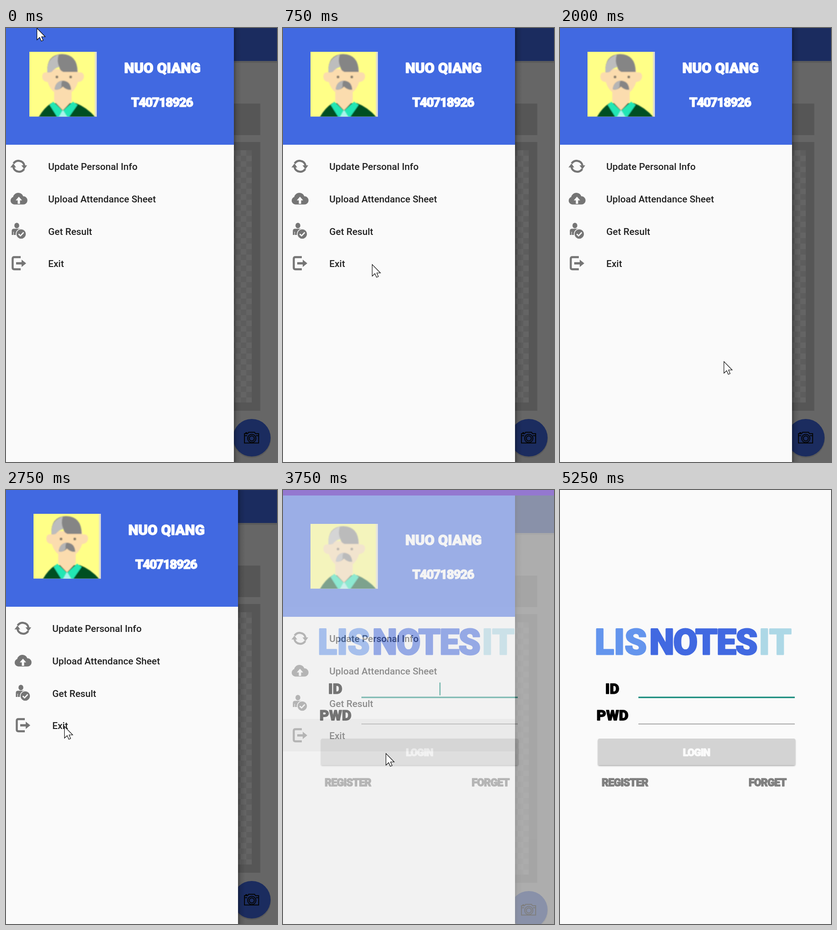
Write an HTML page that moves like this. It is 591 by 948 pixels and loops after 5.5 s.

```html
<!DOCTYPE html>
<html lang="en">
<head>
<meta charset="utf-8">
<title>Check-in app: log out</title>
<style>
  html, body { margin: 0; width: 100%; height: 100%; overflow: hidden; background: #fafafa; }
  svg { display: block; width: 591px; height: 948px; }
  .chunky { font-family: Roboto, "Open Sans", sans-serif; font-weight: 900; stroke: currentColor; stroke-width: 1.5; stroke-linejoin: round; fill: currentColor; }
  .mid { text-anchor: middle; }
  .menu { font: 500 20.7px Roboto, sans-serif; fill: #212121; }
  .icon { fill: #757575; }
  .line { fill: none; stroke: #757575; stroke-width: 4.4; }
</style>
</head>
<body>
<svg viewBox="0 0 591 948">
  <defs>
    <linearGradient id="edge">
      <stop offset="0" stop-opacity=".32"/>
      <stop offset=".4" stop-opacity=".1"/>
      <stop offset="1" stop-opacity="0"/>
    </linearGradient>
    <pattern id="checker" x="536" y="267" width="24" height="24" patternUnits="userSpaceOnUse">
      <path fill="#5d5d5d" d="M0 0h24v24H0z"/>
      <path fill="#646464" d="M0 0h12v12H0zM12 12h12v12H12z"/>
    </pattern>
    <filter id="soft" x="-5%" y="-20%" width="110%" height="150%">
      <feDropShadow dx="0" dy="2" stdDeviation="1.6" flood-opacity=".35"/>
    </filter>
    <filter id="blur"><feGaussianBlur stdDeviation="1"/></filter>
    <clipPath id="photo"><path d="M51 52h147v141.500H51z"/></clipPath>
  </defs>

  <rect width="591" height="948" fill="#fafafa"/>

  <g id="home">
    <!-- dimmed page behind the drawer -->
    <rect width="591" height="970" fill="#666"/>
    <rect y="72" width="591" height="4" fill="#5b5b5b"/>
    <rect y="-12" width="591" height="84" fill="#1b2c5f"/>
    <path fill="#565656" d="M36 165h518.500v69H36zM36 249h518.500v587H36z"/>
    <path fill="url(#checker)" d="M55 267h481v551H55z"/>
    <circle cx="536" cy="897" r="42" fill="#5a5a5a"/>
    <circle cx="536" cy="895" r="41" fill="#1b2c5f"/>
    <g fill="none" stroke="#050505" stroke-width="2">
      <path d="M520 886h7l2-3h13l2 3h7v20.500h-31zM520 890.500h6M545 890.500h6M522 884h4"/>
      <circle cx="536" cy="896.500" r="9"/>
      <circle cx="536" cy="896.500" r="5.500"/>
    </g>

    <g id="drawer">
      <rect x="497" y="-12" width="16" height="982" fill="url(#edge)"/>
      <rect x="-9" width="506" height="970" fill="#fafafa"/>
      <rect x="-9" y="-12" width="506" height="267" fill="#4169e1"/>

      <g clip-path="url(#photo)">
        <path fill="#ffff87" d="M51 52h147v142H51z"/>
        <g filter="url(#blur)">
          <path fill="#d9d9d9" d="M194 50h6v146h-6z"/>
          <path fill="#064f23" d="M71 195Q83 174 99 164H152Q176 173 195 195z"/>
          <path fill="#fbdcae" d="M91 90H157V97Q170 95 170 106Q169 117 157 118Q153 132 143 140V160L124 180L105 160V140Q95 132 91 118Q79 117 79 106Q79 95 91 97z"/>
          <path fill="#23e6b4" d="M103 161L124 181L146 161L156 168L137 195H112L95 168z"/>
          <path fill="#a9f4ec" d="M124 179L134 195H115z"/>
          <path fill="#858585" d="M90 97Q88 58 122 57Q156 58 156 96H125Q117 93 116 84Q105 88 99 96z"/>
          <path fill="#bdbdbd" d="M90 97Q88 66 115 58Q110 72 116 85Q105 88 99 96z"/>
          <path fill="#858585" d="M124 115Q141 116 142 135Q132 136 124 128Q115 137 106 134Q108 116 124 115z"/>
          <path fill="#b5b5b5" d="M123 115Q108 117 106 134Q116 137 121 128Q120 120 123 115z"/>
          <circle cx="111" cy="107" r="3" fill="#857b69"/>
          <circle cx="141" cy="107" r="3" fill="#857b69"/>
        </g>
      </g>
      <g class="chunky mid" color="#fff">
        <text x="341" y="98" font-size="31">NUO QIANG</text>
        <text x="340" y="172" font-size="28" letter-spacing="-1.500">T40718926</text>
      </g>

      <g id="ripple">
        <path fill="#f6f6f6" d="M34 478h237v124H34z"/>
        <path fill="#f1f1f1" d="M40 478h228v70H40z"/>
      </g>
      <rect id="pressed" x="-9" y="478" width="506" height="71" fill="#e9e9e9"/>

      <g id="menu" class="menu"></g>

      <g class="icon">
        <path class="line" d="M16.500 296A13 13 0 0 1 40 300M39.500 308A13 13 0 0 1 16 304"/>
        <path d="M33.500 300H46L40 308.500zM9.500 304.500H22L16 296z"/>

        <path d="M18 385.500A8.500 8.500 0 0 1 15.500 369A11.500 11.500 0 0 1 37.500 367.500A9 9 0 0 1 38 385.500z"/>
        <path fill="#fafafa" d="M28 368.500L35 376.500H30.500V384H25.500V376.500H21z"/>

        <ellipse cx="23.500" cy="431.500" rx="5.300" ry="6"/>
        <path d="M12.500 452V443Q12.500 438.500 17 438.500H30Q34.500 438.500 34.500 443V452z"/>
        <path stroke="#fafafa" stroke-width="1" d="M16.500 452V445"/>
        <circle cx="33" cy="450" r="11" stroke="#fafafa" stroke-width="1.500"/>
        <path fill="none" stroke="#fafafa" stroke-width="2.600" d="M27.500 450L31.500 454L38.500 446.500"/>

        <path class="line" d="M32 500.500H18Q14.500 500.500 14.500 504V523.500Q14.500 527 18 527H32"/>
        <path d="M22 511.500H34V506L44 514L34 522V516.500H22z"/>
      </g>
    </g>
    <rect id="dim" y="-12" width="591" height="982" fill-opacity=".06"/>
  </g>

  <g id="login">
    <rect width="591" height="948" fill="#fafafa"/>
    <g class="chunky" font-size="77" style="stroke-width:3">
      <text x="76" y="359" color="#6495ed">LIS</text>
      <text x="195" y="359" color="#4169e1" letter-spacing="-2">NOTES</text>
      <text x="434" y="359" color="#add8e6">IT</text>
    </g>
    <g class="chunky mid" color="#000" font-size="32">
      <text x="114" y="444.500">ID</text>
      <text x="114.500" y="502.500">PWD</text>
    </g>
    <path fill="#0c8676" d="M171 451.500h341v3H171z"/>
    <path fill="#777" d="M171 510.500h341v1.300H171z"/>
    <rect x="83" y="543" width="430" height="57.500" rx="3" fill="#d3d3d3" filter="url(#soft)"/>
    <g class="chunky mid">
      <text x="297.500" y="580.500" color="#fafafa" font-size="22" letter-spacing="-.9">LOGIN</text>
      <g color="#808080" font-size="23" letter-spacing="-.8">
        <text x="141.500" y="647">REGISTER</text>
        <text x="452.500" y="647">FORGET</text>
      </g>
    </g>
    <rect id="caret" x="341" y="420.500" width="2.600" height="28" fill="#0c8676"/>
  </g>

  <rect id="status" width="591" height="12" fill="#9478d0"/>
  <path id="cursor" d="M.5 .5V26L6.500 20.500L10 28.500L14 27L10.500 19H18.500z" fill="#fff" stroke="#000" stroke-width="1.100"/>
</svg>

<script>
const LOOP = 5500;
const $ = id => document.getElementById(id);
const show = (id, on) => { $(id).style.display = on ? '' : 'none'; };
const move = (id, x, y) => $(id).setAttribute('transform', `translate(${x} ${y})`);

['Update Personal Info', 'Upload Attendance Sheet', 'Get Result', 'Exit'].forEach((label, i) => {
  const text = document.createElementNS('http://www.w3.org/2000/svg', 'text');
  text.setAttribute('x', 92);
  text.setAttribute('y', 310.4 + i * 70.6);
  text.textContent = label;
  $('menu').append(text);
});

// pointer positions: [time, x, y]
const pointer = [
  [0, 67, 0], [250, 71, 13], [500, 220, 389], [750, 194, 516], [1000, 133, 526],
  [1250, 132, 526], [1500, 285, 633], [1750, 374, 735], [2000, 357, 728],
  [2250, 134, 542], [2500, 127, 527], [2750, 127, 516], [3500, 224, 575], [4500, 353, 911]
];
const within = (t, from, to) => t >= from && t < to;

function draw(t) {
  const fading = within(t, 3750, 4000);
  const [, x, y] = pointer.findLast(step => step[0] <= t);
  move('cursor', x, y);
  show('cursor', t < 4750);

  show('home', t < 4000);
  move('home', 0, fading ? 22 : 0);
  move('drawer', t < 250 ? 0 : 9, 0);
  show('ripple', within(t, 3500, 3750));
  show('pressed', fading);
  show('dim', fading);
  show('status', fading);

  show('login', t >= 3750);
  $('login').setAttribute('opacity', fading ? 0.5 : 1);
  show('caret', within(t, 3750, 4250) || within(t, 4750, 5250));
}

const start = performance.now();
function tick() {
  draw((performance.now() - start) % LOOP);
  requestAnimationFrame(tick);
}
tick();
</script>
</body>
</html>
```
